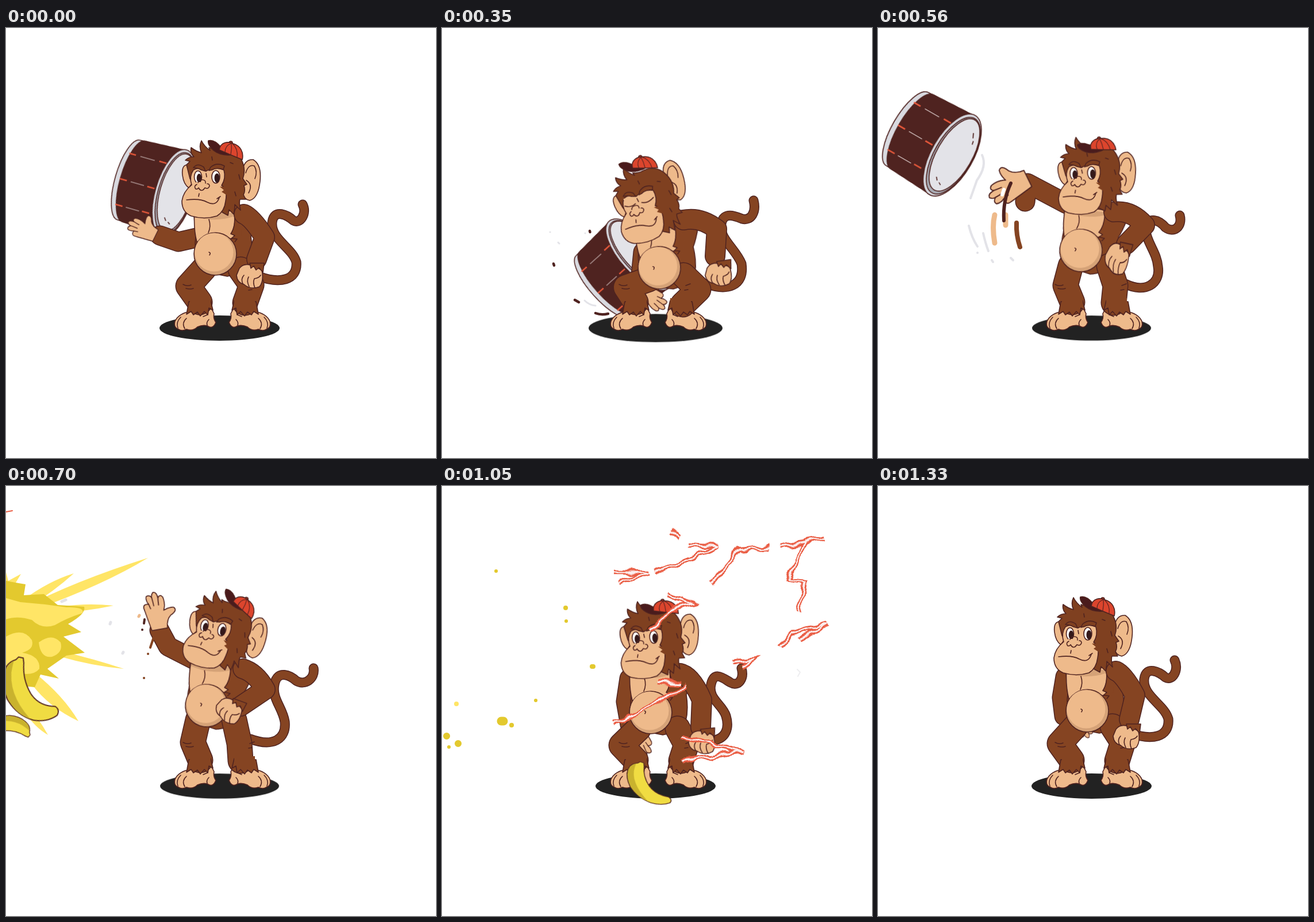
An HTML page without scripts that plays this animation: 748 by 748 pixels, repeating every 1.4 s.

```html
<!DOCTYPE html>
<html lang="en">
<head>
<meta charset="utf-8">
<title>Monkey throws a drum</title>
<style>
html, body { margin: 0; width: 100%; height: 100%; overflow: hidden; background: #fff }
svg { display: block; width: 748px; height: 748px }

/* Every part lists its key poses as --a to --g; all share one stepped timeline. */
@keyframes pose {
  0%, 5% { transform: var(--a); animation-timing-function: steps(4) }
  25% { transform: var(--b); animation-timing-function: steps(3) }
  40% { transform: var(--c); animation-timing-function: steps(2) }
  50%, 55% { transform: var(--d); animation-timing-function: steps(2) }
  65% { transform: var(--e); animation-timing-function: steps(2) }
  75% { transform: var(--f); animation-timing-function: steps(4) }
  95%, 100% { transform: var(--g) }
}
@keyframes bend {
  0%, 5% { d: var(--a); animation-timing-function: steps(4) }
  25% { d: var(--b); animation-timing-function: steps(3) }
  40% { d: var(--c); animation-timing-function: steps(2) }
  50%, 55% { d: var(--d); animation-timing-function: steps(2) }
  65% { d: var(--e); animation-timing-function: steps(2) }
  75% { d: var(--f); animation-timing-function: steps(4) }
  95%, 100% { d: var(--g) }
}
.pose { animation: pose 1.4s infinite }
.limb path { animation: bend 1.4s infinite; fill: none; stroke-linecap: round; stroke-linejoin: round; stroke: #4f2320; stroke-width: calc(var(--w) + 3px) }
.limb path + path { stroke: #854422; stroke-width: var(--w) }

/* Brief visibility: --t is the start, the class gives the length. */
@keyframes one { 0% { visibility: visible } 5%, 100% { visibility: hidden } }
@keyframes two { 0% { visibility: visible } 10%, 100% { visibility: hidden } }
@keyframes three { 0% { visibility: visible } 15%, 100% { visibility: hidden } }
@keyframes four { 0% { visibility: visible } 20%, 100% { visibility: hidden } }
.one, .two, .three, .four { animation: one 1.4s step-end infinite; animation-delay: calc(var(--t) - 1.4s) }
.two { animation-name: two }
.three { animation-name: three }
.four { animation-name: four }

.ink { stroke: #4f2320; stroke-width: 1.6; stroke-linejoin: round; stroke-linecap: round }
.line { fill: none }
.fur { fill: #854422 }
.hair { fill: #7f4020 }
.skin { fill: #eeba8b }
.tan { fill: #d5a277 }
.dark { fill: #4f2320 }
.lemon { fill: #ffe566 }
.gold { fill: #e3c92e }
.marks path { fill: none; stroke-linecap: round }
.bolt { fill: none; stroke: #ea5e45; stroke-width: 8.5; stroke-linejoin: miter }
.core { stroke: #fbeeee; stroke-width: 2.8 }

#shadow { transform-origin: 371.5px 522px; --a: scale(1); --b: scale(1.115); --c: scale(.99); --d: scale(.99); --e: scale(1); --f: scale(1); --g: scale(1) }
#drum {
  --a: translate(254px,276px) rotate(16deg) scale(1);
  --b: translate(313px,421px) rotate(-42deg) scale(1);
  --c: translate(91px,199px) rotate(30deg) scale(1.1,1.02);
  --d: translate(-190px,200px) rotate(60deg) scale(1.1,1.02);
  --e: var(--d); --f: var(--d); --g: var(--d)
}
#head {
  transform-origin: 340px 273px;
  --a: translate(0,0) rotate(0deg);
  --b: translate(-3px,45px) rotate(-16deg);
  --c: translate(7px,-6px) rotate(-2deg);
  --d: translate(8px,-15px) rotate(13deg);
  --e: translate(9px,-1px) rotate(2deg);
  --f: translate(4px,5px) rotate(-3deg);
  --g: translate(0,-2px) rotate(0deg)
}
#ear {
  transform-origin: 427px 265px;
  --a: translate(0,0) rotate(0deg);
  --b: translate(-21px,0) rotate(-20deg);
  --c: translate(6px,-13px) rotate(-3deg);
  --d: translate(10px,0) rotate(9deg);
  --e: translate(10px,3px) rotate(2deg);
  --f: translate(4px,-6px) rotate(-3deg);
  --g: translate(0,-4px) rotate(0deg)
}
#cap {
  transform-origin: 392px 215px;
  --a: translate(0,0) rotate(0deg);
  --b: translate(-40px,23px) rotate(-24deg);
  --c: translate(-1px,-9px) rotate(-22deg);
  --d: translate(22px,-4px) rotate(20deg);
  --e: translate(11px,2px) rotate(-8deg);
  --f: translate(-3px,-1px) rotate(-17deg);
  --g: translate(0,-3px) rotate(0deg)
}
.torso {
  transform-origin: 364px 393px;
  --a: translate(0,0) rotate(0deg);
  --b: translate(14px,24px) rotate(-5deg);
  --c: translate(-11px,-6px) rotate(7deg);
  --d: translate(-15px,-11px) rotate(7deg);
  --e: translate(-5px,1px) rotate(4deg);
  --f: translate(-1px,1px) rotate(0deg);
  --g: translate(0,-2px) rotate(0deg)
}
#palm {
  --a: translate(254px,358px) rotate(26deg) scale(.85);
  --b: translate(350px,457px) rotate(-140deg) scale(.9);
  --c: translate(252px,266px) rotate(-26deg) scale(1.2);
  --d: translate(266px,241px) rotate(80deg) scale(1.05);
  --e: translate(259px,291px) rotate(22deg) scale(1);
  --f: translate(338px,425px) rotate(-110deg) scale(.9);
  --g: translate(345px,400px) rotate(-120deg) scale(.8)
}
#fist {
  transform-origin: 424px 433px;
  --a: translate(0,0) rotate(0deg) scale(1);
  --b: translate(57px,-3px) rotate(-8deg) scale(1);
  --c: translate(-9px,-30px) rotate(12deg) scale(.9,1.3);
  --d: translate(-37px,-41px) rotate(20deg) scale(1);
  --e: translate(-27px,-8px) rotate(4deg) scale(1);
  --f: translate(28px,14px) rotate(-6deg) scale(1);
  --g: translate(8px,5px) rotate(0deg) scale(1)
}
#tail {
  --w: 14px;
  --a: path("M440 432C475 445 508 440 505 407C498 382 460 367 463 338C466 313 490 326 500 335C512 342 524 322 516 307");
  --b: path("M460 445C495 458 527 450 521 410C512 385 480 365 486 340C490 318 512 328 522 332C538 336 547 320 542 300");
  --c: path("M430 445C465 462 492 445 487 415C485 390 468 375 465 350C470 325 490 335 500 347C515 358 530 345 525 326");
  --d: path("M425 440C465 455 488 440 485 410C481 385 462 370 467 345C472 318 495 330 505 339C520 348 538 335 535 317");
  --e: path("M445 450C480 465 501 440 492 410C483 385 462 375 467 352C474 328 490 338 502 346C516 355 530 340 526 325");
  --f: path("M470 443C495 440 500 420 494 400C488 380 462 370 468 345C474 320 490 335 502 342C516 350 526 335 521 317");
  --g: path("M440 430C475 443 508 438 505 405C498 380 460 365 463 336C466 311 490 324 500 333C512 340 524 320 516 303")
}
#backArm {
  --w: 32px;
  --a: path("M335 364L300 372L268 361");
  --b: path("M350 390L345 440L360 457");
  --c: path("M328 306L260 270L256 302");
  --d: path("M327 302L282 279L267 251");
  --e: path("M327 325L288 321L268 304");
  --f: path("M326 335L320 375L327 415");
  --g: path("M326 332L320 368L324 400")
}
#frontArm {
  --w: 33px;
  --a: path("M414 324Q428 330 450 364L436 402");
  --b: path("M420 334Q450 328 478 350L475 397");
  --c: path("M410 320Q440 316 464 343L432 376");
  --d: path("M412 318Q435 325 451 354L408 383");
  --e: path("M416 328Q436 336 450 368L416 403");
  --f: path("M414 326Q434 330 452 372L450 420");
  --g: path("M414 322Q428 328 447 364L437 406")
}
#backLeg {
  --w: 42px;
  --a: path("M345 418L317 449L337 477");
  --b: path("M360 437L320 451L337 477");
  --c: path("M335 414L326 448L338 477");
  --d: path("M334 407L325 446L338 477");
  --e: path("M344 422L315 452L337 477");
  --f: path("M342 422L312 451L337 477");
  --g: path("M345 416L316 448L337 477")
}
#frontLeg {
  --w: 42px;
  --a: path("M408 420L427 447L416 478");
  --b: path("M420 430L446 455L419 481");
  --c: path("M402 414L413 448L410 478");
  --d: path("M397 407L406 448L408 478");
  --e: path("M410 422L427 450L416 478");
  --f: path("M410 422L425 450L416 478");
  --g: path("M408 418L426 446L416 478")
}
#bananaA {
  transform-origin: 278px 340px;
  --a: translate(-500px,0) rotate(120deg) scale(.9); --b: var(--a); --c: var(--a);
  --d: translate(-238px,14px) rotate(102deg) scale(.92);
  --e: translate(0,0) rotate(0deg) scale(1);
  --f: translate(80px,177px) rotate(108deg) scale(.56,.76);
  --g: translate(150px,640px) rotate(200deg) scale(.5)
}
#bananaB {
  transform-origin: 278px 340px;
  --a: translate(-500px,80px) rotate(-140deg) scale(.6); --b: var(--a); --c: var(--a);
  --d: translate(-274px,86px) rotate(-140deg) scale(.6);
  --e: translate(183px,283px) rotate(111deg) scale(.58);
  --f: translate(520px,560px) rotate(240deg) scale(.58);
  --g: var(--f)
}
#burst { transform-origin: 0 255px; --a: scale(1); --b: scale(1); --c: scale(1); --d: scale(1); --e: scale(1.6); --f: scale(1.6); --g: scale(1.6) }
</style>
</head>
<body>
<svg viewBox="0 0 748 748">
<defs>
  <filter id="rough" filterUnits="userSpaceOnUse" x="0" y="0" width="748" height="748" color-interpolation-filters="sRGB">
    <feTurbulence type="fractalNoise" baseFrequency=".05" numOctaves="1" seed="4"/>
    <feDisplacementMap in="SourceGraphic" scale="18" xChannelSelector="R" yChannelSelector="G"/>
  </filter>
  <g id="foot" class="ink">
    <path class="skin" d="M320 493Q300 497 294 510Q291 521 300 524Q306 528 314 524Q325 528 333 520Q342 516 350 518Q360 525 365 512Q360 505 362 497L357 487Z"/>
    <path class="line" d="M299 522Q295 512 304 503M311 523Q305 513 314 505M350 517Q348 512 353 507M343 502L350 499"/>
  </g>
  <path id="cuff" d="M318 476L314 498L322 493L326 499L333 494L338 501L345 493L351 499L353 487L360 491L356 474Z"/>
  <g id="banana">
    <path d="M222 363L231 360Q262 356 285 335Q305 315 299 285Q303 274 315 278Q332 294 333 320Q331 352 305 376Q275 398 245 391Q234 387 228 376L222 372Z" fill="#f0dc42" stroke="#5a2f22" stroke-width="2.2" stroke-linejoin="round"/>
    <path d="M231 379Q288 386 332 326Q329 354 304 375Q275 396 246 390Q236 386 231 379Z" fill="#c9b22e"/>
  </g>
  <path id="splat" d="M-24 -32Q10 -32 18 -8Q25 8 22 25Q18 32 8 31Q10 6 -2 -10Q-10 -26 -24 -32Z"/>
  <path id="curl" d="M-14 -46L8 -36Q24 -15 24 10Q12 22 6 38Q-15 50 -32 42Q-34 30 -18 24Q2 14 5 -8Q2 -30 -14 -46Z"/>
  <path id="boltsEarly" d="M203 50L155 92L172 130L152 182L235 168L310 130L340 150L380 150L408 124L370 185M228 73L275 58L312 92L285 112L310 130M285 155L280 200L298 245L300 290L270 350M205 198L180 225L168 258L146 285M165 318L240 385L320 392M217 398L190 438L165 440L215 475M290 400L292 440L285 480M320 277L365 265L400 270L418 248"/>
  <path id="boltsLate" d="M398 80L415 93M425 102L480 105L435 125L370 150M300 150L360 150L310 168M468 170L515 112L568 107M588 104L630 98L662 88M635 95L617 130L602 165L630 168L622 218M588 283L610 255L670 238L620 268M388 188L435 203L405 210L365 250M298 414L340 395L428 347M375 340L415 343M415 436L522 461L418 478M505 306L540 302L522 315"/>
</defs>

<ellipse id="shadow" class="pose" cx="371.5" cy="522" rx="104.5" ry="22" fill="#222"/>
<g id="tail" class="limb"><path/><path/></g>

<g id="drum" class="pose">
  <g class="ink">
    <path d="M-42 -72L40 -77V77L-42 72A24 72 0 0 1 -42 -72Z" fill="#d9dae0"/>
    <path class="dark" d="M-33 -73L42 -77V77L-33 73A24 73 0 0 1 -33 -73Z"/>
    <ellipse cx="40" rx="33" ry="78" fill="#d3d4db"/>
    <ellipse cx="42" rx="30" ry="73" fill="#a9abb4"/>
    <ellipse cx="43" cy="-2" rx="28" ry="69" fill="#e3e3e8"/>
    <path class="line" d="M52 -50l3 7M58 -38l1 5M36 46l3 4M44 52l3 2"/>
  </g>
  <path d="M-54 -45h12M0 -46h13M-58 2h13M-8 2h13M-53 47h13M-5 46h13" stroke="#e4573a" stroke-width="2.6"/>
  <path d="M-34 -45h26M-38 2h24M-34 47h24" stroke="#d9c9c8" stroke-width="1.2"/>
</g>

<g id="backArm" class="limb"><path/><path/></g>
<g id="palm" class="pose ink">
  <path class="skin" d="M8 -13Q-6 -14 -12 -22Q-18 -35 -24 -29Q-26 -22 -22 -12Q-32 -17 -44 -14Q-50 -10 -44 -6Q-55 -5 -54 1Q-50 5 -46 4Q-52 8 -49 13Q-42 15 -36 11Q-38 20 -31 20Q-18 18 8 13Z"/>
  <path class="line" d="M-44 -6L-32 -5M-46 4L-32 3M-36 11L-28 9"/>
</g>

<path class="torso pose ink fur" d="M388 312Q425 300 438 326Q432 350 426 362Q430 388 425 408Q408 428 385 432L350 425Q325 400 330 365L327 325Z"/>
<use href="#foot"/>
<use href="#foot" transform="translate(753) scale(-1 1)"/>
<g id="backLeg" class="limb"><path/><path/></g>
<g id="frontLeg" class="limb"><path/><path/></g>
<g class="fur ink">
  <use href="#cuff"/>
  <use href="#cuff" transform="translate(753) scale(-1 1)"/>
</g>
<path class="fur" d="M320 470H356V480H320ZM397 470H433V480H397Z"/>
<path class="ink line" d="M308 446q7 4 14 1M313 453q8 2 13 0M424 448l8 -3M422 456l6 -1"/>

<g class="torso pose ink">
  <path class="skin" d="M328 318H397Q402 345 396 366L332 372Q326 350 328 318Z"/>
  <path class="tan" stroke="none" d="M329 322H397L398 327Q365 339 329 328Z"/>
  <circle class="tan" cx="364" cy="393" r="37"/>
  <circle class="skin" cx="362" cy="390" r="33.5" stroke="none"/>
  <path class="fur" d="M397 322L411 340L408 372L398 372L402 367L392 366L398 361L391 358Q399 345 397 322Z" stroke="none"/>
  <path class="line" d="M353 333Q357 345 352 356M353 390q4 1 1 5M397 322Q400 345 391 358L398 361L392 366L402 367L398 372"/>
</g>

<g id="frontArm" class="limb"><path/><path/></g>
<g id="fist" class="pose ink">
  <path class="skin" d="M406 418Q414 408 428 413L445 421Q449 440 441 450Q425 456 414 446Q402 443 401 430Z"/>
  <path class="line" d="M412 445Q408 436 414 430M423 450Q418 440 422 433M433 452Q429 443 432 436M432 436Q440 435 443 430"/>
  <path class="fur" d="M424 409L426 418L431 414L435 421L440 417L447 425L449 409Z"/>
</g>

<g id="ear" class="pose ink">
  <path class="skin" d="M411 250Q414 228 430 229Q445 238 442 266Q439 296 424 300Q413 298 411 286Z"/>
  <path class="line" d="M417 252Q422 236 432 240Q438 250 433 262M418 265Q430 272 422 287"/>
</g>

<g id="head" class="pose ink">
  <path class="skin" d="M316 238Q305 238 307 256Q309 272 318 278L330 262Z"/>
  <path class="hair" d="M314 238L320 232L312 230Q318 224 327 224Q320 217 322 208Q331 215 340 217Q335 206 340 196Q345 206 355 213L353 208Q360 211 368 210Q396 204 409 228Q418 245 412 262L419 272L414 274Q417 284 413 290L417 298L407 298Q405 303 408 317L398 307Q398 314 396 324L388 316L386 326L375 320L345 300L320 262Z"/>
  <path class="skin" d="M326 247Q336 241 348 249Q362 240 379 247Q383 261 375 274Q386 279 382 301Q380 319 367 327Q345 334 322 327Q306 320 306 301Q308 285 323 273Q318 258 326 247Z"/>
  <path class="hair" stroke="none" d="M383 276L372 276L379 282L375 285L386 292Z"/>
  <g fill="#fff">
    <ellipse cx="334" cy="259" rx="6.5" ry="10.5"/>
    <ellipse cx="365" cy="259" rx="7" ry="11"/>
  </g>
  <g fill="#35191a" stroke="none">
    <ellipse cx="336" cy="261" rx="4.3" ry="7.5"/>
    <ellipse cx="367" cy="261" rx="4.5" ry="8"/>
  </g>
  <g class="four" style="--t:210ms">
    <path class="skin" stroke="none" d="M325 247H343V271H325ZM355 247H374V272H355Z"/>
    <path class="line" d="M324 260Q333 266 343 261M354 262Q364 267 376 259"/>
  </g>
  <path class="hair" d="M326 243Q333 234 344 242L347 249L340 247Q333 243 326 243ZM353 248L356 242Q367 233 380 240L378 246Q366 242 358 247Z"/>
  <path class="skin" stroke="none" d="M331 268H350V279Q340 287 331 279Z"/>
  <path class="line" d="M334 269Q335 264 341 264Q348 264 347 270M332 272Q326 275 330 280Q333 281 335 278Q340 287 346 278Q352 281 354 275Q354 271 350 271M336 288L335 293M314 299Q338 296 350 303Q366 311 371 295M367 297L373 293M348 253l1 6"/>
  <path class="line" d="M405 255l2 8M398 285l2 7M358 224l1 6M390 234l5 2"/>
</g>

<g id="cap" class="pose ink">
  <path d="M352 196Q362 193 374 207L390 221Q372 222 361 213Q350 203 352 196Z" fill="#4a1b1c"/>
  <circle cx="391" cy="200" r="3" fill="#c23a26"/>
  <path d="M371 212C373 198 386 197 395 201C408 205 414 216 411 229Q391 221 371 212Z" fill="#dc452d"/>
  <path class="line" d="M391 201Q381 205 381 216M392 201Q393 210 391 220M394 201Q404 210 402 225" stroke-width="1.1"/>
</g>

<g class="two marks" style="--t:280ms" stroke="#4f2320" stroke-width="4.5">
  <path d="M257 353l.5 2M194 410l1 3M231 473l7 4M267 496q10 4 22 1"/>
  <path stroke="#e3e3e8" stroke-width="3" d="M248 474q8 8 19 9M188 355h.1M202 373l2 2M249 357h.1"/>
</g>
<g class="one marks" style="--t:560ms" stroke-width="4">
  <path stroke="#e3e3e8" d="M181 221Q190 240 172 265Q166 282 161 296M158 344Q163 365 173 380M183 357Q187 375 192 388M173 391h.1M198 404l2 3M231 400l4 4"/>
  <path stroke="#eeba8b" stroke-width="9" d="M203 325Q198 345 203 374M222 325v18"/>
  <path stroke="#4f2320" stroke-width="6" d="M231 270Q217 300 219 335"/>
  <path stroke="#854422" stroke-width="8" d="M241 339Q240 360 247 381"/>
  <path stroke="#fff" stroke-width="6" d="M194 258l8 -8M216 290l3 -9"/>
</g>
<g class="two marks" style="--t:700ms" stroke-width="4">
  <path stroke="#e3e3e8" stroke-width="5" d="M182 237l-1 3M204 289l-1 2M97 201l7 -3"/>
  <path stroke="#eeba8b" stroke-width="5" d="M232 225l-1 2"/>
  <path stroke="#854422" d="M257 263L251 281M247 292h.1M240 334h.1"/>
  <path stroke="#4f2320" d="M241 232l-1 7M237 250h.1"/>
  <path stroke="#ea5e45" stroke-width="2" d="M0 45l11 -2"/>
</g>

<g class="three" style="--t:700ms">
  <g id="burst" class="pose">
    <path class="lemon" d="M30 212Q120 165 247 125Q170 172 50 215ZM30 198Q75 165 118 152Q85 182 40 210ZM0 180L0 150L4 165L26 153L10 180ZM95 210Q140 203 187 208Q140 218 95 220ZM98 288Q150 300 205 318Q150 313 95 297ZM50 325Q100 365 126 409Q75 385 45 345ZM30 375Q55 400 73 433Q50 420 30 390Z"/>
    <path class="gold" d="M0 165L22 169L34 171L31 190L66 188L90 207L136 210Q140 222 108 240L131 254L100 262L137 290L105 295L72 318L92 335L60 328L50 350L0 345Z"/>
    <path class="lemon" d="M0 195L25 202L68 206L105 211Q138 210 133 221Q105 230 85 242Q62 250 45 233Q20 225 0 232ZM0 262Q30 245 45 268Q50 284 28 290Q60 295 58 318Q45 335 0 320ZM57 272Q80 255 95 272Q100 290 80 297Q60 300 57 272Z"/>
  </g>
</g>

<g class="two" style="--t:840ms">
  <g class="gold">
    <use href="#splat" transform="translate(100 172)"/>
    <use href="#splat" transform="translate(171 140) rotate(10) scale(.72)"/>
    <path d="M40 197Q50 202 58 224Q52 238 33 243Q43 222 40 197Z"/>
    <use href="#curl" transform="translate(217 232) rotate(-22) scale(.65)"/>
    <use href="#curl" transform="translate(246 326) rotate(22) scale(.75)"/>
    <use href="#curl" transform="translate(149 366)"/>
    <path d="M0 427Q38 412 50 390Q68 425 48 460Q28 488 0 483ZM86 50Q98 44 112 54Q110 62 94 61Q86 58 86 50ZM453 132l9 2l-1 5l-7 -1ZM317 151Q350 143 390 149Q350 153 317 153ZM100 335l12 9l-5 1Z"/>
    <ellipse cx="124" cy="203" rx="7" ry="5"/>
  </g>
  <g class="lemon">
    <circle cx="22" cy="453" r="6.5"/>
    <ellipse cx="225" cy="235" rx="4" ry="6"/>
    <ellipse cx="253" cy="317" rx="5" ry="7"/>
    <circle cx="153" cy="386" r="7"/>
    <ellipse cx="128" cy="403" rx="7" ry="4"/>
    <path d="M579 455Q610 457 636 467Q605 466 579 455ZM678 486Q700 485 725 493Q700 493 678 486ZM164 554Q180 563 187 582L182 584ZM602 5L618 0H607Z"/>
  </g>
</g>

<g class="two" style="--t:840ms" filter="url(#rough)">
  <use href="#boltsEarly" class="bolt"/>
  <use href="#boltsEarly" class="bolt core"/>
  <path class="bolt" stroke-dasharray="14 6" style="stroke-width:4" d="M130 76L75 78L65 120M65 148L55 200M62 380L70 410L68 460M105 470L170 470"/>
</g>

<g id="bananaA" class="pose"><use href="#banana"/></g>
<g id="bananaB" class="pose"><use href="#banana"/></g>

<g class="two" style="--t:980ms">
  <g filter="url(#rough)">
    <use href="#boltsLate" class="bolt"/>
    <use href="#boltsLate" class="bolt core"/>
  </g>
  <g class="marks" stroke="#e3c92e">
    <path stroke-width="6" d="M94 148h.1M163 373h.1M12 454h.1M216 235h.1"/>
    <path stroke-width="8" d="M215 212h.1M121 416h.1M261 314h2"/>
    <path stroke-width="12" d="M8 435h.1M28 448h.1"/>
    <path stroke-width="15" d="M103 409h4"/>
    <path stroke="#ffe566" stroke-width="8" d="M25 379h.1"/>
    <path stroke="#eeeef0" stroke-width="2" d="M618 319l5 5l-4 7"/>
  </g>
</g>
</svg>
</body>
</html>
```
